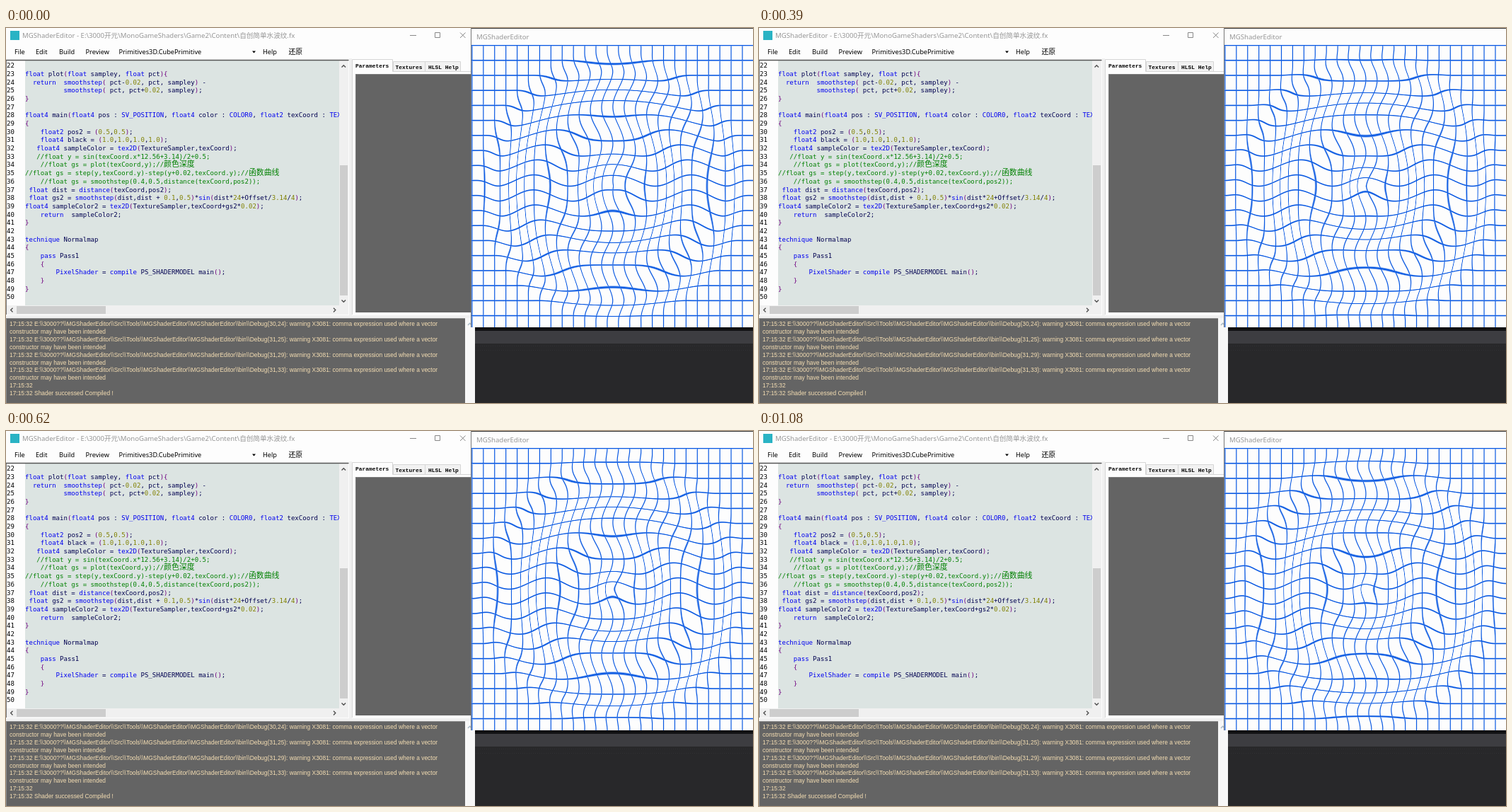
Write an HTML page with a canvas that moves like this. It is 1056 px wide and 530 px high and loops after 1.17 s.

```html
<!DOCTYPE html>
<html lang="en">
<head>
<meta charset="utf-8">
<title>Water ripple shader</title>
<style>
  html, body { margin: 0; width: 100%; height: 100%; overflow: hidden; background: #fdfdfd; }
  svg, canvas { position: absolute; display: block; }
  svg { left: 0; top: 0; }
  canvas { left: 658px; top: 24px; }
  text { white-space: pre; }
  .ui { font-family: "Noto Sans", "Noto Sans CJK SC", "Noto Sans CJK", sans-serif; font-size: 9.2px; }
  .title { font-size: 9.6px; fill: #969696; }
  .code { font-family: "DejaVu Sans Mono", "Noto Sans CJK SC", "Noto Sans CJK", monospace; font-size: 9.05px; fill: #000050; }
  .tab { font-family: "Liberation Mono", monospace; font-size: 7.9px; font-weight: bold; }
  .log { font-family: "Liberation Sans", sans-serif; font-size: 8.41px; fill: #f5deb3; }
  .line { fill: none; stroke: #888; }
  .arrow { fill: none; stroke: #505050; stroke-width: 1.4; }
</style>
</head>
<body>
<svg width="1056" height="530" viewBox="0 0 1056 530">
  <rect width="1056" height="530" fill="#fdfdfd"/>

  <!-- Editor title bar and menu -->
  <rect x="6" y="4" width="13" height="13" fill="#2ab3c4"/>
  <text class="ui title" x="23" y="14">MGShaderEditor - E:\3000开元\MonoGameShaders\Game2\Content\自创简单水波纹.fx</text>
  <path class="line" d="M571 10.5h9M606.5 6.5h7v7h-7zM642 6.5l7.5 7.5M649.5 6.5l-7.5 7.5"/>
  <g class="ui">
    <text x="12" y="37.3">File</text>
    <text x="42" y="37.3">Edit</text>
    <text x="75" y="37.3">Build</text>
    <text x="112.5" y="37.3">Preview</text>
    <text x="159.5" y="37.3">Primitives3D.CubePrimitive</text>
    <text x="363" y="37.3">Help</text>
    <text x="399.5" y="37.3" font-size="9.8">还原</text>
  </g>
  <path d="M348 32.5h5l-2.5 3z"/>

  <!-- Code pane -->
  <rect x="27" y="46" width="444" height="346" fill="#dce4e2"/>
  <g id="code" class="code"></g>
  <rect x="471" y="46" width="13" height="359" fill="#f0f0f0"/>
  <rect x="1" y="392" width="483" height="13" fill="#f0f0f0"/>
  <path d="M472 194h11v184h-11zM15 393h126v11h-126z" fill="#cdcdcd"/>
  <path class="arrow" d="M474.5 55.5l2.8-2.8 2.8 2.8M474.5 384.5l2.8 2.8 2.8-2.8M9.5 395.8l-2.8 2.8 2.8 2.8M463 395.8l2.8 2.8-2.8 2.8"/>
  <path class="line" d="M0 45.5h484.5" stroke-width="1.4" style="stroke:#555"/>
  <path class="line" d="M.5 46v359" style="stroke:#777"/>

  <!-- Parameter pane -->
  <rect x="485" y="43" width="4" height="363" fill="#f0f0f0"/>
  <path d="M547.5 47.5h45v14h-45zM592.5 47.5h50v14h-50z" fill="#f2f2f2" stroke="#d5d5d5"/>
  <path class="line" d="M489.5 405V44.5h57v17h111" style="stroke:#d5d5d5"/>
  <rect x="494" y="65" width="164" height="337" fill="#646464"/>
  <path class="line" d="M494 65.5h164M494.5 65v337" style="stroke:#7c7c7c"/>
  <g class="tab">
    <text x="494" y="55.7">Parameters</text>
    <text x="550.5" y="57.7">Textures</text>
    <text x="597" y="57.7">HLSL Help</text>
  </g>

  <!-- Build log -->
  <rect y="406" width="663" height="4" fill="#f0f0f0"/>
  <rect y="410" width="649" height="120" fill="#646464"/>
  <path class="line" d="M0 410.5h649M.5 410v120" style="stroke:#8c8c8c"/>
  <rect x="649" y="410" width="14" height="120" fill="#f7f7f7"/>
  <path class="arrow" d="M653 420l2.6-2.8 2.6 2.8" style="stroke:#a8b8c4"/>
  <g id="log" class="log"></g>

  <!-- Preview window and the dark desktop below it -->
  <path class="line" d="M657.5 0v423" style="stroke:#777"/>
  <path class="line" d="M658 .5h398" style="stroke:#333"/>
  <text class="ui title" x="665" y="15.5">MGShaderEditor</text>
  <rect x="663" y="423" width="393" height="107" fill="#28282a"/>
  <rect x="663" y="423" width="393" height="5" fill="#111113"/>
  <rect x="663" y="428" width="393" height="18" fill="#3d3d41"/>
  <path class="line" d="M664 449.5h392M664 455.5h392" stroke-dasharray="1 2" style="stroke:#303033"/>
</svg>
<canvas id="preview" width="398" height="399"></canvas>

<script>
const source = `
float plot(float sampley, float pct){
  return  smoothstep( pct-0.02, pct, sampley) -
          smoothstep( pct, pct+0.02, sampley);
}

float4 main(float4 pos : SV_POSITION, float4 color : COLOR0, float2 texCoord : TEX
{
    float2 pos2 = (0.5,0.5);
    float4 black = (1.0,1.0,1.0,1.0);
   float4 sampleColor = tex2D(TextureSampler,texCoord);
   //float y = sin(texCoord.x*12.56+3.14)/2+0.5;
    //float gs = plot(texCoord,y);//颜色深度
//float gs = step(y,texCoord.y)-step(y+0.02,texCoord.y);//函数曲线
    //float gs = smoothstep(0.4,0.5,distance(texCoord,pos2));
 float dist = distance(texCoord,pos2);
 float gs2 = smoothstep(dist,dist + 0.1,0.5)*sin(dist*24+Offset/3.14/4);
float4 sampleColor2 = tex2D(TextureSampler,texCoord+gs2*0.02);
    return  sampleColor2;
}

technique Normalmap
{
    pass Pass1
    {
        PixelShader = compile PS_SHADERMODEL main();
    }
}
`.split("\n");

const byId = id => document.getElementById(id);
const span = (color, text) => `<tspan fill="${color}">${text}</tspan>`;

function highlight(line) {
  const token = /(\/\/.*)|\b(float[24]?|return|smoothstep|tex2D|sin|distance|technique|pass|compile|PixelShader|SV_POSITION|COLOR0|TEX)\b|\b(\d+\.?\d*)|([(){}])/g;
  return line.replace(token, (text, comment, keyword, number) => {
    if (comment) {
      return span("#008000", text.replace(/[\u4e00-\u9fff]+/, cjk => `<tspan font-size="10.9">${cjk}</tspan>`));
    }
    return span(keyword ? "#0000f0" : number ? "#808000" : "#700080", text);
  });
}

byId("code").innerHTML = source.map((line, i) => {
  const y = 56.3 + i * 11.68;
  return `<text x="1" y="${y}" fill="#000">${22 + i}</text><text x="27" y="${y}">${highlight(line)}</text>`;
}).join("");

const warnings = ["30,24", "31,25", "31,29", "31,33"].flatMap(place => [
  String.raw`17:15:32 E:\\3000??\\MGShaderEditor\\Src\\Tools\\MGShaderEditor\\MGShaderEditor\\bin\\Debug(${place}): warning X3081: comma expression used where a vector`,
  "constructor may have been intended"
]);
byId("log").innerHTML = [...warnings, "17:15:32", "17:15:32 Shader successed Compiled !"]
  .map((line, i) => `<text x="5" y="${421.3 + i * 10.86}">${line}</text>`).join("");

const canvas = byId("preview");
const context = canvas.getContext("2d");
const image = context.createImageData(canvas.width, canvas.height);
const SIZE = 398;
const PAPER = [253, 253, 253], INK = [8, 88, 226];

// How much of a pixel is covered by the nearest line of a regular ruling.
function ruling(position, pitch, halfWidth) {
  const distance = Math.abs(position - Math.round(position / pitch) * pitch);
  return Math.min(1, Math.max(0, halfWidth + 0.5 - distance));
}

function smoothstep(from, to, value) {
  const t = Math.min(1, Math.max(0, (value - from) / (to - from)));
  return t * t * (3 - 2 * t);
}

function drawRipple(phase) {
  let p = 0;
  for (let y = 0; y < canvas.height; y++) {
    for (let x = 0; x < SIZE; x++) {
      const dist = Math.hypot(x / SIZE - 0.5, y / SIZE - 0.5);
      const shift = SIZE * 0.02 * smoothstep(dist, dist + 0.1, 0.5) * Math.sin(dist * 24 + phase);
      const ink = Math.max(
        ruling(x + shift - 0.4, SIZE / 25, 0.6),
        ruling(y + shift, SIZE / 18.75, 0.8));
      for (let c = 0; c < 3; c++) image.data[p++] = PAPER[c] + (INK[c] - PAPER[c]) * ink;
      image.data[p++] = 255;
    }
  }
  context.putImageData(image, 0, 0);
}

// The preview updates unevenly: each pose is a start time and a wave phase.
const LOOP = 1170;
const poses = [[0, 1.09], [150, 1.29], [390, 1.91], [620, 2.18], [850, 2.42], [1080, 2.87]];
let shownPhase;

function tick() {
  const time = performance.now() % LOOP;
  const phase = poses.findLast(([start]) => time >= start)[1];
  if (phase !== shownPhase) drawRipple(phase);
  shownPhase = phase;
  requestAnimationFrame(tick);
}
tick();
</script>
</body>
</html>
```
